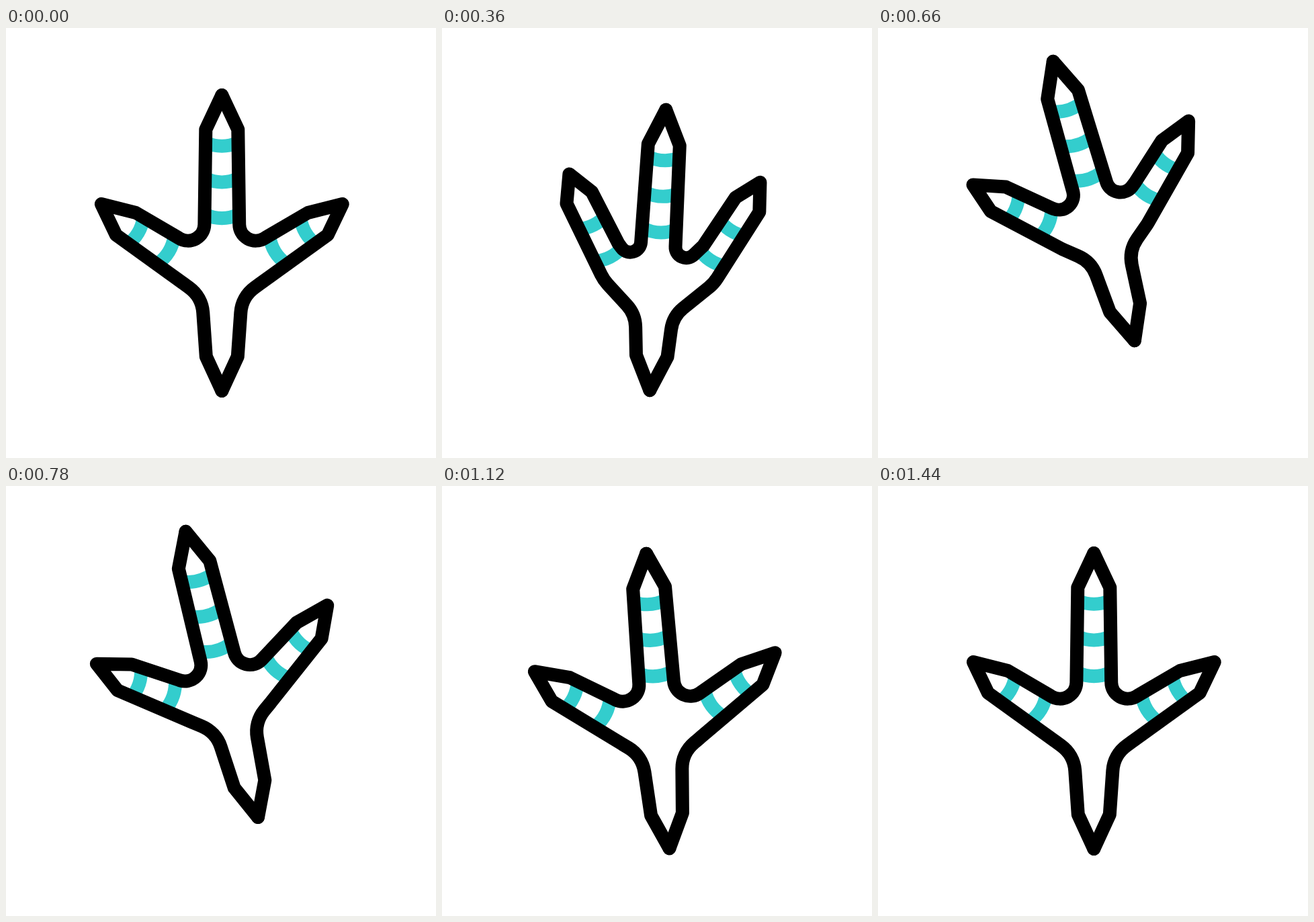
Recreate the animation shown at these times as an HTML page with a canvas. Size 640 by 640 pixels, loop 1.6 s.

```html
<!DOCTYPE html>
<html lang="en">
<head>
<meta charset="utf-8">
<title>Bird foot</title>
<style>
  html, body { margin: 0; height: 100%; overflow: hidden; background: #fff; }
  canvas { display: block; width: 100vw; height: 100vh; }
</style>
</head>
<body>
<canvas id="stage" width="640" height="640"></canvas>
<script>
const LOOP = 1600;
const ctx = document.getElementById('stage').getContext('2d');
const lerp = (a, b, k) => a + (b - a) * k;

// Keys: [time, value, x1, x2]; the last two shape the ease towards the next key.
const grip = [[0, 0], [340, 1], [860, 0]];
const lift = [[0, 0], [280, 32], [555, -71], [1045, 0]];
const tilt = [[0, 0], [280, 8.2], [565, -16.8, 0.35, 0.6], [1440, 0]];

// Cubic Bezier ease with flat ends, solved by bisection.
function ease(u, x1 = 1 / 3, x2 = 2 / 3) {
  let lo = 0, hi = 1, s = u;
  for (let i = 0; i < 24; i++) {
    s = (lo + hi) / 2;
    const x = 3 * x1 * s * (1 - s) ** 2 + 3 * x2 * s * s * (1 - s) + s ** 3;
    if (x < u) lo = s; else hi = s;
  }
  return s * s * (3 - 2 * s);
}

function track(keys, t) {
  const i = keys.findIndex(k => k[0] > t);
  if (i < 0) return keys[keys.length - 1][1];
  const [t0, v0, x1, x2] = keys[i - 1], [t1, v1] = keys[i];
  return lerp(v0, v1, ease((t - t0) / (t1 - t0), x1, x2));
}

// Stripes down a toe, each bowed towards the palm; angle is measured from straight up.
function stripes(x, y, angle, count) {
  const radius = 62, spread = 0.4, step = 53.7;
  ctx.save();
  ctx.translate(x, y);
  ctx.rotate(angle * Math.PI / 180);
  for (let i = 0; i < count; i++) {
    ctx.beginPath();
    ctx.arc(0, i * step - radius, radius, Math.PI / 2 - spread, Math.PI / 2 + spread);
    ctx.stroke();
  }
  ctx.restore();
}

// The corners of one half for grip k; the closed side toes lean to the right.
function corners(k, side) {
  const axis = (open, shut) => open.map((v, i) => lerp(v, shut[i], k));
  const toe = (open, shut) => {
    const [x, y] = axis(open, shut);
    return [x + 4 * side * k, y - 2 * side * k];
  };
  return {
    shoulder: axis([24, -169], [23.5, -157]),
    crotch: axis([26.5, 14.5], [26.5, 33]),
    web: toe([65, -8], [63, -8]),
    top: toe([128, -45], [107, -83]),
    tip: toe([179.5, -58], [142, -107.5]),
    low: toe([157.5, -12], [143.5, -63.5]),
    bend: toe([58, 59.7], [82, 47]),
    heel: axis([29.7, 80], [28, 97.5]),
    spur: axis([23.5, 169], [23.3, 158]),
    stripe: toe([125, -15], [101.5, -34])
  };
}

function outline(p, k) {
  const end = lerp(220, 209, k);
  ctx.beginPath();
  ctx.moveTo(0, -end);
  ctx.lineTo(...p.shoulder);
  ctx.arcTo(...p.crotch, ...p.web, lerp(24.5, 16, k));
  for (const q of [p.web, p.top, p.tip, p.low]) ctx.lineTo(...q);
  ctx.arcTo(...p.bend, ...p.heel, 60);
  ctx.arcTo(...p.heel, ...p.spur, 50);
  ctx.lineTo(...p.spur);
  ctx.lineTo(0, end);
  ctx.stroke();
}

function eachSide(k, paint) {
  for (const side of [-1, 1]) {
    ctx.save();
    ctx.scale(side, 1);
    paint(corners(k, side));
    ctx.restore();
  }
}

function draw(t) {
  const k = track(grip, t);
  ctx.clearRect(0, 0, 640, 640);
  ctx.save();
  ctx.translate(321.3, 320 + track(lift, t));
  ctx.rotate(track(tilt, t) * Math.PI / 180);
  ctx.lineWidth = 20;
  ctx.lineJoin = 'round';

  ctx.strokeStyle = '#33cdcd';
  ctx.lineCap = 'butt';
  stripes(0, lerp(-144.5, -133.7, k), 0, 3);
  eachSide(k, p => stripes(...p.stripe, lerp(59, 30, k), 2));

  ctx.strokeStyle = '#000';
  ctx.lineCap = 'round';
  eachSide(k, p => outline(p, k));
  ctx.restore();
}

function tick() {
  draw(performance.now() % LOOP);
  requestAnimationFrame(tick);
}
tick();
</script>
</body>
</html>
```
